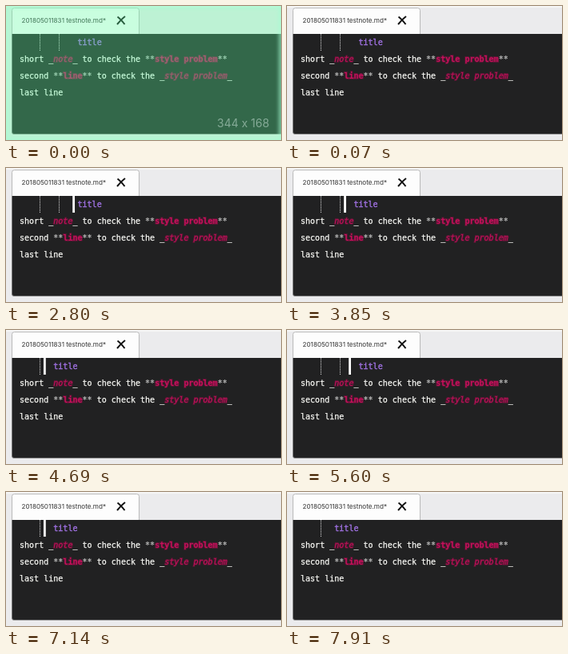
An HTML page that plays this animation: 344x168 px, repeating every 8 s.

```html
<!DOCTYPE html>
<html lang="en">
<head>
<meta charset="utf-8">
<style>
  html, body { margin: 0; width: 100%; height: 100%; overflow: hidden; background: #ebebed; }
  svg { display: block; width: 344px; height: 168px; }
  text { white-space: pre; }
  .code { font: 10.04px "DejaVu Sans Mono", monospace; fill: #fafaf6; stroke: #fafaf6; stroke-width: .25; }
  .mark { fill: #b4b4b4; stroke: #b4b4b4; }
  .strong, .em { fill: #c8105c; stroke: #a00c4a; stroke-opacity: .4; stroke-width: 1.8; paint-order: stroke; }
  .strong { font-weight: bold; }
  .em { font-style: italic; }
  .title { fill: #a172e4; stroke: #a172e4; stroke-width: .35; }
  .tab { font: 8.15px Inter, sans-serif; fill: #333; }
  .size { font: 14px Inter, sans-serif; fill: #86ab98; }
</style>
</head>
<body>
<svg viewBox="0 0 344 168">
  <defs>
    <filter id="soft" x="-10%" y="-10%" width="120%" height="120%"><feGaussianBlur stdDeviation="2"/></filter>
  </defs>
  <rect width="344" height="168" fill="#ebebed"/>
  <rect width="344" height="2" fill="#f6f6f6"/>
  <path d="M7.5 36V5.500q0-3 3-3H163.500q3 0 3 3V36z" fill="#fdfdfd" stroke="#aaa" stroke-width=".8"/>
  <text class="tab" x="19.5" y="21">201805011831 testnote.md*</text>
  <path d="M139.500 13.500q4 3 9 9.500M149 13q-4 3-10 10" fill="none" stroke="#111" stroke-width="2"/>
  <path d="M7.500 35.500H346V160.500H10q-2.500 0-2.500-2.500z" fill="#212122" stroke="#777" stroke-width="1"/>
  <path d="M8 35H344V37H8z" fill="#212122"/>
  <g stroke="#d8d8d8" stroke-width="1" stroke-dasharray="1 1">
    <path d="M42.500 35V56"/>
    <path id="innerGuide" d="M66.500 35V56"/>
  </g>
  <g class="code">
    <text id="title" class="title" y="49">title</text>
    <text x="17" y="70">short _<tspan class="em">note</tspan>_ to check the <tspan class="mark">**</tspan><tspan class="strong">style problem</tspan><tspan class="mark">**</tspan></text>
    <text x="17" y="91">second <tspan class="mark">**</tspan><tspan class="strong">line</tspan><tspan class="mark">**</tspan> to check the _<tspan class="em">style problem</tspan>_</text>
    <text x="17" y="112">last line</text>
  </g>
  <rect id="caret" width="2.8" height="21" fill="#fff"/>
  <g id="flash">
    <rect width="344" height="168" fill="#5affa0" opacity=".32"/>
    <rect width="344" height="168" fill="none" stroke="#a4fdd2" stroke-width="6" opacity=".6" filter="url(#soft)"/>
    <text class="size" x="264" y="152">344 x 168</text>
  </g>
</svg>
<script>
  const LOOP = 8000, LEFT = 17, CELL = 6.04;
  const $ = id => document.getElementById(id);
  const show = (id, on) => $(id).setAttribute("visibility", on ? "visible" : "hidden");
  const columnX = col => LEFT + col * CELL;
  const countPast = (times, t) => times.filter(k => t >= k).length;

  // Caret walk before editing: [time, row, column]
  const moves = [
    [1330, 2, 9], [1470, 1, 9], [1610, 0, 9],
    [1890, 0, 11], [1960, 0, 12], [2660, 0, 11], [3010, 0, 10]
  ];
  const deletes = [3850, 3990, 4130, 4200, 4340, 6580, 6720, 6860, 6930, 7070];
  const inserts = [4900, 5040, 5180, 5320, 5530];
  const CARET_OFF = 7840;

  function draw(t) {
    const shift = countPast(inserts, t) - countPast(deletes, t);
    const titleCol = 12 + shift;
    $("title").setAttribute("x", columnX(titleCol));
    show("innerGuide", titleCol > 8);

    const move = moves.filter(m => t >= m[0]).pop();
    show("caret", move && t < CARET_OFF);
    if (move) {
      $("caret").setAttribute("x", columnX(move[2] + shift) - 0.2);
      $("caret").setAttribute("y", 35 + move[1] * 21);
    }
    show("flash", t < 70);
  }

  const start = performance.now();
  function frame() {
    draw((performance.now() - start) % LOOP);
    requestAnimationFrame(frame);
  }
  frame();
</script>
</body>
</html>
```
